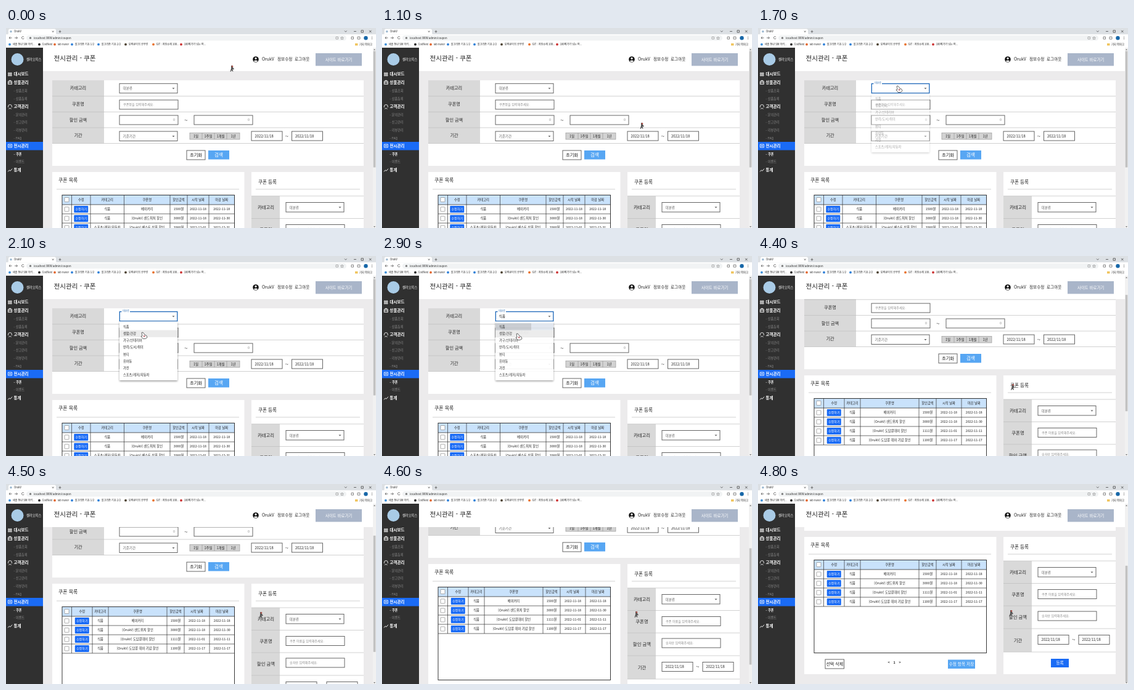
Write an HTML page that moves like this. It is 600 by 325 pixels and loops after 5100 ms.

```html
<!DOCTYPE html>
<html lang="ko">
<head>
<meta charset="utf-8">
<title>Coupon admin</title>
<style>
html, body { margin: 0; width: 100%; height: 100%; overflow: hidden; background: #fff; }
svg { display: block; width: 100vw; height: 100vh; font-family: "Noto Sans CJK KR", "Noto Sans CJK", "Noto Sans", sans-serif; }
</style>
</head>
<body>
<svg id="stage" viewBox="0 0 600 325" lang="ko"></svg>
<script>
const LOOP = 5100, STEP = 100;
const BRAND = 'OrukV';
const INK = '#222', EDGE = '#555', RULE = '#bdbdbd', BLUE = '#1a6bf5', SKY = '#57a6f3', HINT = '#8a8a8a';

// Drawing helpers; cy is the middle of the text line
const text = (x, cy, s, size, { fill = INK, at = 'start', w = 400, more = '' } = {}) =>
  `<text x="${x}" y="${(cy + size * 0.36).toFixed(2)}" font-size="${size}" fill="${fill}" text-anchor="${at}" font-weight="${w}" ${more}>${s.replace(/</g, '&lt;')}</text>`;
const mid = (x, cy, s, size, o = {}) => text(x, cy, s, size, { at: 'middle', ...o });
const rect = (x, y, x2, y2, fill, stroke = 'none', more = '') =>
  `<rect x="${x}" y="${y}" width="${x2 - x}" height="${y2 - y}" fill="${fill}" stroke="${stroke}" ${more}/>`;
const line = (x, y, x2, y2, stroke = RULE, w = 0.7) =>
  `<path d="M${x} ${y}L${x2} ${y2}" stroke="${stroke}" stroke-width="${w}" fill="none"/>`;
const stroke = (d, c = '#444', w = 0.7) => `<path d="${d}" fill="none" stroke="${c}" stroke-width="${w}"/>`;
const dot = (x, y, r, fill) => `<circle cx="${x}" cy="${y}" r="${r}" fill="${fill}"/>`;
const box = (x, y, x2, y2) => rect(x, y, x2, y2, '#fff', EDGE, 'stroke-width=".9"');
const arrow = (x, y) => `<path d="M${x - 2} ${y - 1}h4l-2 2.2z" fill="#666"/>`;
const field = (x, y, hint) => box(x, y, x + 95, y + 15) + text(x + 6, y + 7.5, hint, 5.1, { fill: HINT });
const select = (x, y, s) => box(x, y, x + 94, y + 15.5) + text(x + 5.5, y + 8, s, 5.6, { fill: '#666' }) + arrow(x + 87.5, y + 8);
const date = (x, y) => box(x, y, x + 50, y + 15) + text(x + 5.5, y + 7.5, '2022/11/18', 5.8, { w: 500 });
const button = (x, y, x2, y2, s, size, fill) =>
  rect(x, y, x2, y2, fill) + mid((x + x2) / 2, (y + y2) / 2, s, size, { fill: '#fff', w: 500 });
const outline = (x, y, x2, y2, s, size) => box(x, y, x2, y2) + mid((x + x2) / 2, (y + y2) / 2, s, size);

function chrome() {
  const marks = [
    [6, '새솔 청년 SW 아카...', '#3d8fd8'], [54, 'CodNest', '#222'], [79, 'lab nuvor', '#e2672f'],
    [107, '알고리즘 기초 1/2', '#2f80d8'], [150, '알고리즘 기초 2/2', '#2f80d8'], [194, '모찌콩이의 공부방', '#4b4030'],
    [239, 'GIT : 저장소에 100...', '#e8702a'], [284, '100메가가 넘는 파...', '#c33']];
  return rect(0, 0, 600, 10.5, '#dce0e4') +
    '<path d="M2 10.5Q4 10.5 4 8V4Q4 1.5 6.5 1.5H79Q81 1.5 81 4V8Q81 10.5 83 10.5z" fill="#fff"/>' +
    dot(8, 5.8, 1.8, '#9bb8d0') + text(13, 5.8, BRAND, 4.2) +
    stroke('M75 4.5l2.4 2.4m0-2.4l-2.4 2.4M85.5 5.8h4m-2-2v4') +
    stroke('M549 4.5l1.8 1.8 1.8-1.8M564 5.5h4M576 3.8h3.4v3.4h-3.4zM589 3.8l3.5 3.5m0-3.5l-3.5 3.5', '#333') +
    rect(0, 10.5, 600, 32, '#fff') +
    stroke('M9.5 16h-4.5m2-2l-2 2 2 2M14 16h4.5m-2-2l2 2-2 2M29 14.6a2 2 0 1 0 .3 2') +
    rect(33, 12, 552, 20.5, '#f1f3f4', 'none', 'rx="4.2"') + dot(39.5, 16.2, 1.6, '#777') +
    text(45, 16.2, 'localhost:3000/admin/coupon', 4.3) +
    stroke('M535 14.5h3.5v3.5h-3.5zM545 14l.7 1.5 1.7.2-1.2 1.2.3 1.7-1.5-.8-1.5.8.3-1.7-1.2-1.2 1.7-.2z', '#666', 0.5) +
    stroke('M560 14.5h3.5v3.5h-3.5zM570 14.5h4v3.5h-4z', '#555', 0.7) +
    dot(583.5, 16.2, 3.2, '#1767a8') + [14.4, 16.2, 18].map(y => dot(593.5, y, 0.5, '#444')).join('') +
    marks.map(([x, s, c]) => dot(x, 26.7, 1.9, c) + text(x + 4.7, 26.7, s, 4.15)).join('') +
    rect(566, 25, 570.5, 28.5, '#f0c45c') + text(573, 26.7, '기타 북마크', 4.3);
}

function sidebar() {
  const heads = [['대시보드', 75], ['상품관리', 88.5], ['고객관리', 128], ['전시관리', 191.5], ['통계', 231]];
  const subs = [['상품조회', 102], ['상품등록', 115], ['문의관리', 141], ['신고관리', 153.5], ['리뷰관리', 166],
    ['FAQ', 179], ['쿠폰', 205], ['이벤트', 217.5]];
  const icons = ['M3.8 72.8h2v2h-2zm3.2 0h2v2h-2zm-3.2 3h2v2h-2zm3.2 0h2v2h-2z',
    'M3.5 86.8h6v4.6h-6zM5 86.8v-1.5h3v1.5M3.5 89h6',
    'M3.6 129v-1.6a2.9 2.9 0 0 1 5.8 0V129M4.4 131.4q2-2 4.2 0',
    'M3.5 189h6v5h-6zM5.2 191.5h2.6M6.5 190.2v2.6',
    'M3.2 233.5l2.2-2.6 1.6 1.4 3-3.6'];
  return rect(0, 32, 60, 325, '#303030') + dot(18.5, 51, 10, '#a9cbe6') +
    text(33, 51, '셀러오피스', 5.3, { fill: '#fff' }) + rect(0, 185, 60, 198.5, BLUE) +
    heads.map(([s, y]) => text(12.5, y, s, 6.5, { fill: '#fff', w: 700 })).join('') +
    subs.map(([s, y]) => text(12.5, y, '- ' + s, 5.2, s === '쿠폰' ? { fill: '#fff', w: 700 } : { fill: '#8b8b8b' })).join('') +
    icons.map(d => stroke(d, '#fff', 0.9)).join('');
}

function header() {
  return rect(60, 32, 595, 70, '#fff') + text(77.5, 49, '전시관리 - 쿠폰', 10.6, { w: 500 }) +
    dot(405, 51, 4.8, '#111') + dot(405, 49.4, 1.6, '#fff') + '<path d="M401.8 53.8q3.2-2.8 6.4 0-3.2 3-6.4 0z" fill="#fff"/>' +
    text(415, 51, BRAND, 6.9) + text(440, 51, '정보수정', 6.6) + text(468, 51, '로그아웃', 6.6) +
    button(502, 41, 577, 61.5, '사이트 바로가기', 6.5, '#a9b5c9');
}

function searchCard() {
  const rows = [85, 110.8, 136.4, 162, 187.5];
  const cells = [298, 318, 338, 358, 379];
  return rect(75, 85, 580, 224, '#fff') + rect(75, 85, 159, 187.5, '#d9d9d9') +
    rows.slice(1).map(y => line(75, y, 580, y)).join('') +
    ['카테고리', '쿠폰명', '할인 금액', '기간'].map((s, i) => mid(117, rows[i] + 12.9, s, 7.2, { w: 500 })).join('') +
    '<g id="category"></g>' + field(184, 117, '쿠폰명을 입력해주세요.') +
    box(184, 142, 279, 157) + box(305, 142, 400, 157) +
    [274, 395].map(x => text(x, 149.5, '0', 5.4, { at: 'end', fill: HINT })).join('') + mid(292, 149.5, '~', 9) +
    select(184, 168, '기준기간') + rect(298, 170.5, 379, 181, '#d2d2d2', '#999', 'stroke-width=".7"') +
    ['1일', '1주일', '1개월', '1년'].map((s, i) =>
      mid((cells[i] + cells[i + 1]) / 2, 175.7, s, 5.5) + (i ? line(cells[i], 170.5, cells[i], 181, '#999') : '')).join('') +
    date(398, 168) + mid(455.5, 175.5, '~', 9) + date(463.5, 168) +
    outline(293, 199, 323, 214, '초기화', 7.3) + button(328, 199, 362, 213.5, '검색', 7.6, SKY);
}

const base = [
  ['식품', '베이커리', '1500원', '2022-11-18', '2022-11-18'],
  ['식품', `[${BRAND}] 샌드위치 할인`, '3000원', '2022-11-18', '2022-11-30']];
const allRows = [...base, ['스포츠/레저/자동차', `[${BRAND}] 베스트 상품 할인`, '3900원', '2022-12-01', '2022-12-31']];
const foodRows = [...base,
  ['식품', `[${BRAND}] 도담콩데이 할인`, '1111원', '2022-11-01', '2022-11-11'],
  ['식품', `[${BRAND}] 도담콩 데이 기념 할인`, '1100원', '2022-11-17', '2022-11-17']];

function table(rows, cols) {
  const center = i => (cols[i] + cols[i + 1]) / 2;
  const check = y => rect(95, y - 3.6, 102, y + 3.6, '#fff', '#888', 'stroke-width=".7" rx=".8"');
  const bottom = 287 + rows.length * 15;
  return rect(91, 271.5, 370.5, 422.5, '#fff') + rect(91, 271.5, 370.5, 287, '#c9e2fb') + check(279) +
    ['수정', '카테고리', '쿠폰명', '할인금액', '시작 날짜', '마감 날짜'].map((s, i) =>
      mid(center(i + 1), 279, s, 5.3, { w: 500 })).join('') +
    rows.map((row, r) => {
      const y = 294.5 + r * 15, c = center(1);
      return check(y) + rect(c - 11.5, y - 5.5, c + 11.5, y + 5.5, BLUE, 'none', 'rx="1"') +
        mid(c, y, '수정하기', 5.1, { fill: '#fff' }) +
        row.map((s, i) => mid(center(i + 2), y, s, 5.25)).join('') + line(91, y + 7.5, 370.5, y + 7.5, '#333', 0.7);
    }).join('') +
    cols.slice(1, -1).map(x => line(x, 271.5, x, bottom, '#333', 0.7)).join('') + line(91, 287, 370.5, 287, '#333', 0.8) +
    rect(91, 271.5, 370.5, 422.5, 'none', '#222', 'stroke-width=".9"');
}

function listCard() {
  return rect(75, 234, 386.5, 457, '#fff') + text(85, 247.5, '쿠폰 목록', 7.9, { w: 500 }) + line(82, 262, 378, 262) +
    `<g id="all">${table(allRows, [91, 106.5, 137, 191.5, 266, 294, 329, 370.5])}</g>` +
    `<g id="food">${table(foodRows, [91, 106.5, 140, 166, 261, 289, 330, 370.5])}</g>` +
    outline(109, 433, 139.5, 448, '선택 삭제', 7) +
    ['<', '1', '>'].map((s, i) => mid(212 + i * 9, 438.5, s, 5.4, { w: 700 })).join('') +
    button(308, 433.5, 352, 448, '수정 항목 저장', 6.7, SKY);
}

function formCard() {
  const rows = [273, 309.5, 346, 383, 421];
  return rect(398, 234, 580, 457, '#fff') + text(409, 250, '쿠폰 등록', 7.6, { w: 500 }) + line(405, 262, 574, 262) +
    rect(398, 273, 444, 421, '#d9d9d9') + rows.map(y => line(398, y, 580, y)).join('') +
    ['카테고리', '쿠폰명', '할인 금액', '기간'].map((s, i) =>
      mid(421.5, (rows[i] + rows[i + 1]) / 2, s, 7.4, { w: 500 })).join('') +
    select(454, 283.5, '대분류') + field(454, 319.5, '쿠폰 이름을 입력해주세요.') + field(454, 355, '숫자만 입력해주세요.') +
    date(454, 393.5) + mid(512, 401, '~', 9) + date(520, 393.5) + button(475, 432, 504, 446, '등록', 6.6, BLUE);
}

const items = ['식품', '생활/건강', '가구/인테리어', '반려/도서/취미', '뷰티', '유아동', '가전', '스포츠/레저/자동차'];
const itemY = i => 115 + i * 11.2;
const menu = () => rect(184, 106.5, 278, 202, '#fff', 'none', 'rx="1" filter="url(#shadow)"') +
  rect(184, 0, 278, 11.4, '#ebebeb', 'none', 'id="hover"') +
  `<g id="picked">${rect(184, 109.3, 278, 120.6, '#e0e6ee')}${rect(184, 109.3, 242, 120.6, '#c6cacf')}</g>` +
  items.map((s, i) => text(190, itemY(i), s, 5.2)).join('');

const stage = document.getElementById('stage');
stage.innerHTML =
  '<defs><filter id="shadow" x="-20%" y="-20%" width="140%" height="140%"><feDropShadow dx="0" dy="1.5" stdDeviation="1.6" flood-opacity=".4"/></filter></defs>' +
  rect(60, 32, 600, 325, '#ecebec') +
  `<g id="page">${searchCard()}${listCard()}${formCard()}</g>` +
  header() + rect(595, 32, 600, 325, '#f1f1f1') +
  rect(595.7, 0, 599.3, 189, '#c1c1c1', 'none', 'id="thumb"') +
  '<path d="M596 36h3l-1.5-2zM596 322h3l-1.5 2z" fill="#777"/>' +
  sidebar() + chrome() + `<g id="menu">${menu()}</g>` +
  '<g id="pointer"><path d="M-2-4h3v3l2 3-1.5.5-1.3-1 1.3 4h-1.5l-1-2-1.5 2.5h-1l1.5-5z" fill="#555"/><circle r="1.3" cy="-2.6" fill="#b4574f"/></g>' +
  '<g id="hand"><path d="M-3-4.5l2-.5 3 4 3 1.5 1 3-3 2h-4l-3-4 2-.5z" fill="#fff" stroke="#444" stroke-width=".8"/><circle r="1.5" cx="1.2" cy="1.2" fill="#c9838a"/></g>';

const $ = id => document.getElementById(id);
const show = (id, on) => $(id).setAttribute('display', on ? 'inline' : 'none');

// Linear track through [time, value...] keys
function track(keys, t) {
  const n = keys.findIndex(k => k[0] > t);
  if (n < 0) return keys[keys.length - 1].slice(1);
  const a = keys[n - 1], b = keys[n], p = (t - a[0]) / (b[0] - a[0]);
  return a.slice(1).map((v, i) => v + (b[i + 1] - v) * p);
}
const path = [[0, 367, 65], [400, 382, 90], [500, 382, 90], [900, 442, 163], [1000, 442, 163], [1100, 422, 158],
  [1500, 240, 101], [1700, 228, 99], [2100, 223, 129], [2300, 223, 129], [2600, 221, 117], [2800, 221, 117],
  [2900, 221, 131], [3400, 221, 131], [3700, 342, 209], [3800, 348, 212], [4000, 348, 212], [4300, 413, 212],
  [4500, 414, 212], [4800, 411, 209]];
const scrollKeys = [[0, 0], [4200, 0], [4300, 12], [4400, 40], [4500, 72], [4600, 104], [4700, 134], [4800, 148]];
const fade = [[0, 0], [1600, 0], [1700, 0.4], [1800, 1], [2800, 1], [2900, 0.93], [3000, 0.45], [3100, 0]];

function category(t) {
  const focus = t >= 1700 && t < 3800, chosen = t >= 2800;
  if (!focus && !chosen) return select(184, 90.3, '대분류');
  return rect(184.3, 90.5, 277.8, 105.8, '#fff', focus ? '#1b66b8' : EDGE, `stroke-width="${focus ? 1.3 : 0.9}"`) +
    rect(187.5, 89, 201, 92, '#fff') + text(189, 90, '대분류', 4, { fill: focus ? '#3c76b5' : '#666' }) +
    (chosen ? text(189.5, 98.3, '식품', 5.6) : '') + arrow(271.5, 98.3);
}

let last = -1;
function draw(t) {
  const [x, y] = track(path, t), [scroll] = track(scrollKeys, t), [alpha] = track(fade, t);
  $('page').setAttribute('transform', `translate(0 ${-scroll})`);
  $('thumb').setAttribute('y', 37.5 + scroll * 284 / 441);
  $('category').innerHTML = category(t);
  $('menu').setAttribute('opacity', alpha);
  const row = Math.floor((y - 109.3) / 11.2);
  show('hover', row >= 0 && row < items.length);
  $('hover').setAttribute('y', itemY(Math.max(row, 0)) - 5.7);
  show('picked', t >= 2800);
  show('all', t < 3900);
  show('food', t >= 3900);
  const hand = t >= 1500 && t < 3500 || t >= 3700 && t < 4100;
  show('hand', hand);
  show('pointer', !hand);
  $(hand ? 'hand' : 'pointer').setAttribute('transform', `translate(${x} ${y})`);
}
function tick() {
  const t = Math.floor(performance.now() % LOOP / STEP) * STEP;
  if (t !== last) draw(last = t);
  requestAnimationFrame(tick);
}
tick();
</script>
</body>
</html>
```
